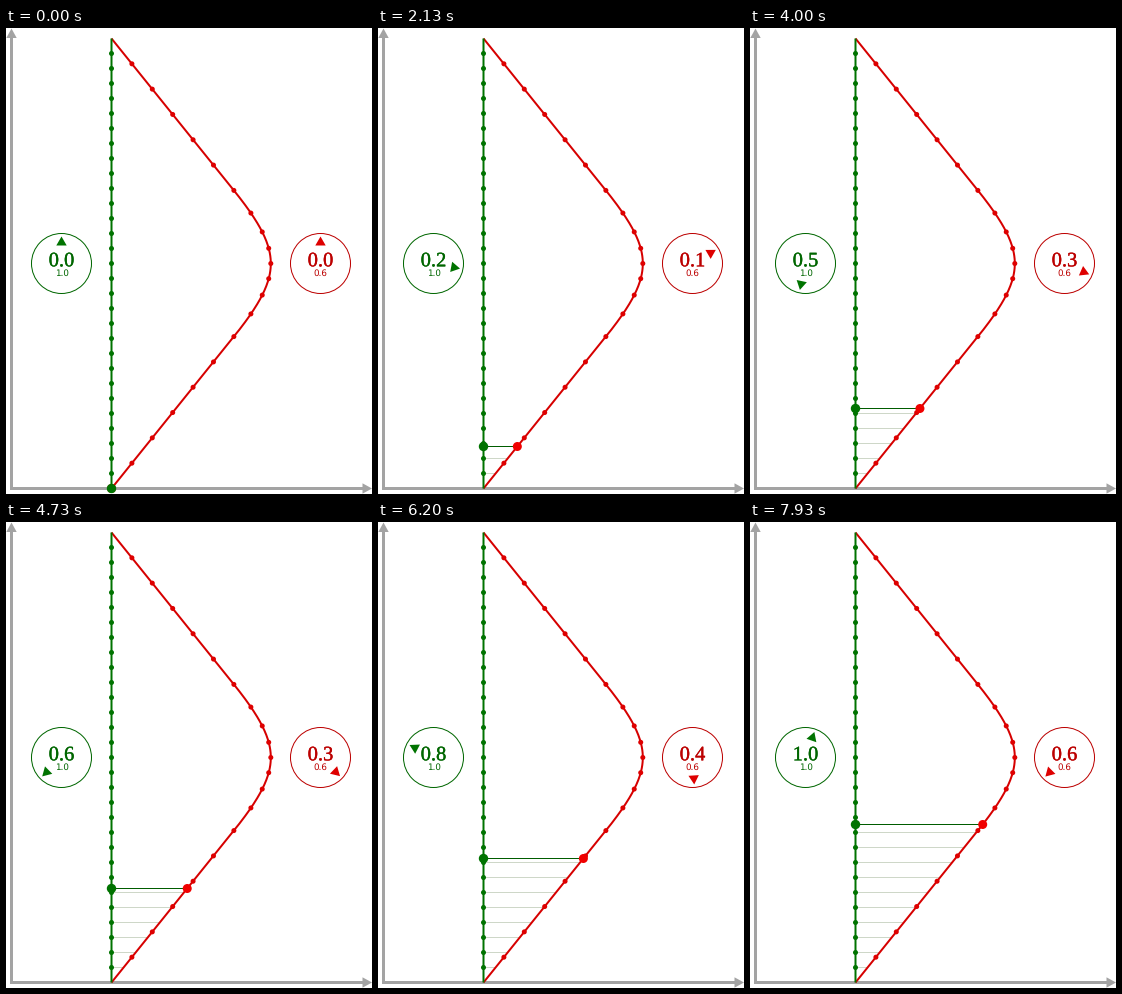
These frames come from a looping animation (366 px wide and 466 px high, 8 s). A matplotlib script:

```python
import math

import numpy as np
import matplotlib.pyplot as plt
from matplotlib import patheffects
from matplotlib.animation import FuncAnimation
from matplotlib.patches import Circle, Polygon

plt.rcParams["text.hinting"] = "none"

W, H, DPI = 366, 466, 100
PX = 72 / DPI
GREEN, RED, GREY = "#007300", "#de0000", "#a3a3a3"
DARK_GREEN, DARK_RED = "#006600", "#bc0000"

# World lines: cruise, uniformly accelerated turnaround, cruise back
X0, Y0 = 105.5, 460.5
TICK = 15                 # pixels per 0.1 of proper time
MID = 225                 # half of the journey
ETA = 1.1143              # cruise rapidity
SPEED = math.tanh(ETA)
CRUISE = 6 * TICK * math.cosh(ETA)
BEND = 4 * TICK / ETA


def traveller_x(t):
    """Horizontal position at coordinate time t."""
    t = min(t, 2 * MID - t)
    if t <= CRUISE:
        return X0 + SPEED * t
    turn = math.hypot(BEND, MID - CRUISE) - math.hypot(BEND, MID - t)
    return X0 + SPEED * CRUISE + turn


def traveller_clock(t):
    """Proper time of the traveller for t up to the midpoint."""
    if t <= CRUISE:
        return t / math.cosh(ETA)
    return 6 * TICK + BEND * (ETA - math.asinh((MID - t) / BEND))


def tick_time(k):
    """Coordinate time of the traveller's k-th tick (20 in all)."""
    if k > 10:
        return 2 * MID - tick_time(20 - k)
    if k <= 6:
        return k * TICK * math.cosh(ETA)
    return MID - BEND * math.sinh(ETA * (10 - k) / 4)


fig = plt.figure(figsize=(W / DPI, H / DPI), dpi=DPI, facecolor="white")
ax = fig.add_axes([0, 0, 1, 1])
ax.set_xlim(0, W)
ax.set_ylim(H, 0)
ax.axis("off")


def line(xs, ys, color, width, z):
    return ax.plot(xs, ys, color=color, lw=width * PX, zorder=z,
                   solid_capstyle="butt", snap=False)[0]


def dot(x, y, color, radius, z):
    return ax.add_patch(Circle((x, y), radius, color=color, lw=0, zorder=z))


class Dial:
    def __init__(self, x, rate, ink, fill):
        self.x, self.y = x, 235.5
        ax.add_patch(Circle((x, self.y), 30, fill=False, ec=ink, lw=PX))
        self.hand = ax.add_patch(Polygon(np.zeros((3, 2)), color=fill, lw=0))
        bolder = [patheffects.withStroke(linewidth=0.35 * PX, foreground=ink)]
        self.label = ax.text(x, 238.3, "", color=ink, ha="center",
                             family="Liberation Serif", size=20.5 * PX,
                             path_effects=bolder)
        ax.text(x, 247.7, rate, color=ink, ha="center",
                family="DejaVu Sans", size=8.8 * PX)

    def show(self, value):
        a = 2 * math.pi * value
        out = np.array([math.sin(a), -math.cos(a)])
        side = np.array([math.cos(a), math.sin(a)])
        c = np.array([self.x, self.y])
        self.hand.set_xy([c + 27 * out, c + 18 * out + 5.2 * side,
                          c + 18 * out - 5.2 * side])
        self.label.set_text(f"{math.floor(value * 10 + 1e-6) / 10:.1f}")


# Axes
line([5.5, 5.5], [8, 462], GREY, 3, 1)
line([4, 359], [Y0, Y0], GREY, 3, 1)
ax.add_patch(Polygon([(5.5, 0.5), (0.3, 10), (10.7, 10)], color=GREY, lw=0))
ax.add_patch(Polygon([(366, Y0), (356.5, Y0 - 5.2), (356.5, Y0 + 5.2)],
                     color=GREY, lw=0))

# Both paths with their clock ticks
ts = np.linspace(0, 2 * MID, 301)
line([traveller_x(t) for t in ts], Y0 - ts, "#d60000", 2, 4)
line([X0, X0], [Y0, Y0 - 2 * MID], GREEN, 2, 4)
home = TICK * np.arange(1, 30)
for t in map(tick_time, range(1, 20)):
    dot(traveller_x(t), Y0 - t, RED, 2.5, 5)
for t in home:
    dot(X0, Y0 - t, GREEN, 2.5, 5)

trail = [line([X0, traveller_x(t)], [Y0 - t] * 2, "#ced7c8", 1, 2)
         for t in home[:10]]
link = line([], [], "#005c00", 1, 3)
red_dot = dot(X0, Y0, "#f00000", 4.5, 6)
green_dot = dot(X0, Y0, GREEN, 4.7, 7)
home_dial = Dial(55.5, "1.0", DARK_GREEN, GREEN)
away_dial = Dial(314.5, "0.6", DARK_RED, RED)


def update(i):
    # Two steps per 200 ms, held unevenly
    step = 2 * (i // 5) + (i % 5 >= 3)
    t = 2 * step
    x, y = traveller_x(t), Y0 - t
    link.set_data([X0, x], [y, y])
    red_dot.center = x, y
    green_dot.center = X0, y
    for k, mark in enumerate(trail, 1):
        mark.set_visible(t >= k * TICK)
    home_dial.show(t / (10 * TICK))
    away_dial.show(traveller_clock(t) / (10 * TICK))
    return []


anim = FuncAnimation(fig, update, frames=200, interval=40, repeat=True,
                     repeat_delay=0)
plt.show()
```
